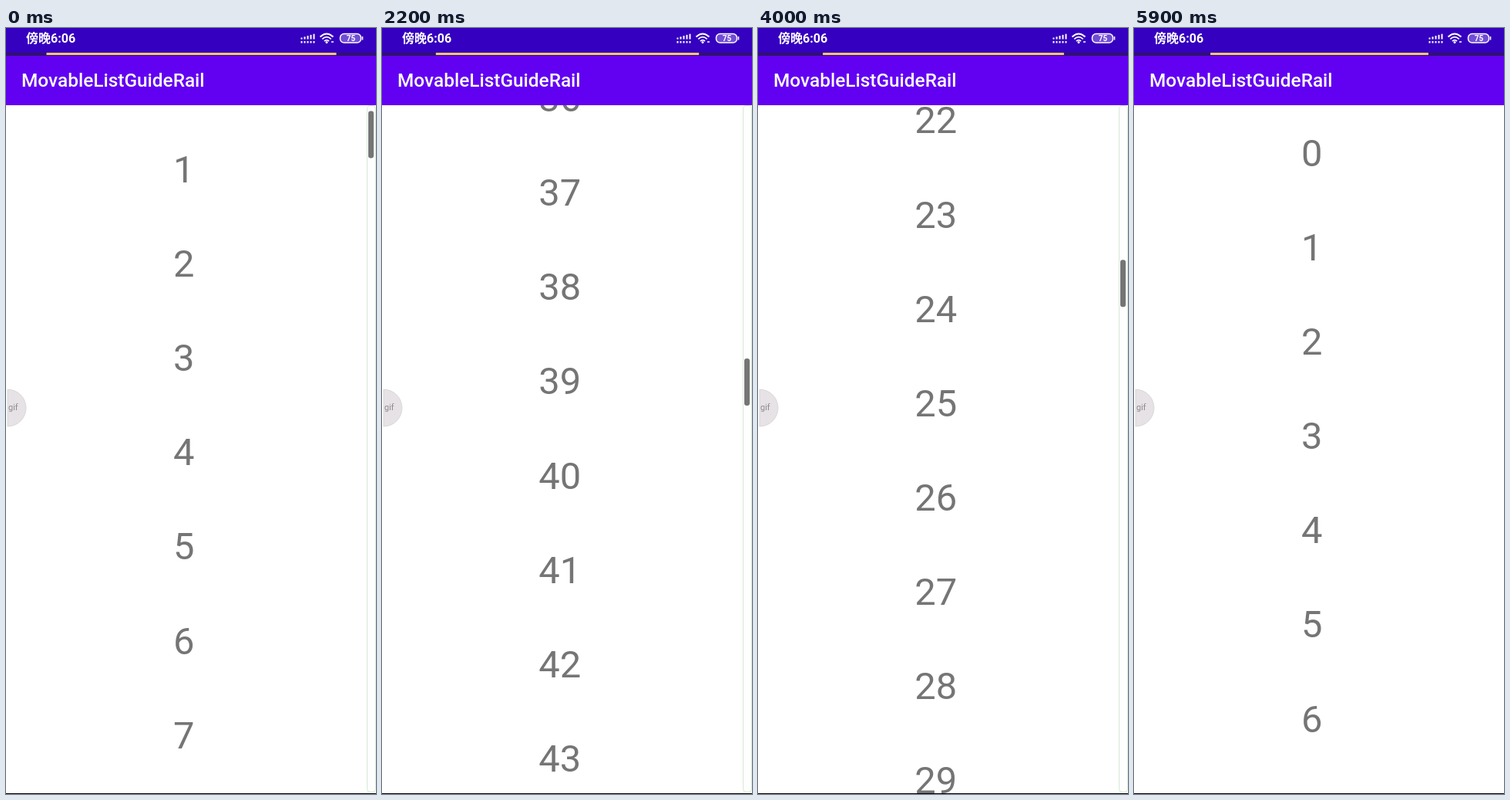
An HTML page that plays this animation: 480x992 px, repeating every 6000 ms.

```html
<!DOCTYPE html>
<html lang="zh">
<head>
<meta charset="utf-8">
<title>List scroll</title>
<style>
  html, body { margin: 0; width: 100%; height: 100%; overflow: hidden; background: #fff; }
  svg { display: block; width: 480px; height: 992px; font-family: Roboto, "Noto Sans CJK SC", "Noto Sans CJK", sans-serif; }
  #list text { font-size: 48.9px; fill: #757575; text-anchor: middle; }
</style>
</head>
<body>
<svg viewBox="0 0 480 992">
  <defs>
    <clipPath id="view"><rect y="100" width="462" height="891"/></clipPath>
  </defs>
  <rect width="480" height="992" fill="#fff"/>

  <g clip-path="url(#view)">
    <g id="list"></g>
    <g id="glow"><circle cx="231" cy="-521" r="591" fill="#8200ff" fill-opacity=".2"/></g>
  </g>

  <g id="bar">
    <rect x="468.5" y="100.5" width="11" height="889" rx="4" fill="#fff" stroke="#d4e8d4"/>
    <rect id="thumb" x="470" y="100" width="7" height="61" rx="3" fill="#757575"/>
  </g>

  <!-- status bar -->
  <rect width="480" height="32" fill="#3500c0"/>
  <rect y="32" width="480" height="4" fill="#30126e"/>
  <rect id="progress" y="32" height="3" fill="#ffc474"/>
  <text x="26" y="19" font-size="16" font-weight="700" fill="#fff">傍晚6:06</text>
  <g id="signal" fill="#fff"></g>
  <g fill="none" stroke="#fff" stroke-width="1.8">
    <path d="M407.500 11.500Q416 3.500 424.500 11.500M410.300 14.300Q416 9 421.700 14.300M413 17Q416 14.200 419 17"/>
    <rect x="433.500" y="7.500" width="27" height="11.500" rx="5" stroke-width="1.5" fill="#fff" fill-opacity=".3"/>
  </g>
  <circle cx="416" cy="18.500" r="1.500" fill="#fff"/>
  <path d="M422 18h3M462.500 11v4.500" stroke="#fff" stroke-width="1.500"/>
  <text x="447.500" y="17" font-size="10" font-weight="700" fill="#fff" text-anchor="middle">75</text>

  <!-- app bar -->
  <rect y="36" width="480" height="64" fill="#6200f2"/>
  <text x="20" y="76" font-size="24.4" font-weight="500" fill="#fff">MovableListGuideRail</text>

  <!-- floating button -->
  <path d="M2 468a24 24 0 0 1 0 48z" fill="#e6e2e6" stroke="#d4d4d4" stroke-width=".8"/>
  <text x="3" y="495" font-size="11" fill="#8c8c8c">gif</text>

  <rect y="991" width="480" height="1" fill="#000"/>
</svg>
<script>
  const LOOP = 6000, STEP = 100, PITCH = 122.15, TOP_HIT = 5.1;
  const $ = id => document.getElementById(id);
  const add = (parent, tag, attrs) => {
    const el = document.createElementNS('http://www.w3.org/2000/svg', tag);
    for (const k in attrs) el.setAttribute(k, attrs[k]);
    return parent.appendChild(el);
  };

  for (let n = 0; n < 60; n++)
    add($('list'), 'text', { x: 230.7, y: 178.6 + n * PITCH }).textContent = n;

  for (let i = 0; i < 5; i++) {
    const x = 382.5 + i * 4, h = 2 + i * 1.2;
    add($('signal'), 'rect', { x, y: 14.5 - h, width: 2, height: h });
    add($('signal'), 'rect', { x, y: 17, width: 2, height: 2.5 });
  }

  // scroll knots: seconds, offset, velocity
  const knots = [
    [0, 101, 700], [1.1, 1510, 1750], [2.2, 4468, 0],
    [3.4, 2492, 0], [4.6, 2967, 0], [TOP_HIT, 0, -6000]
  ];

  function offset(t) {
    const i = knots.findIndex(k => k[0] > t);
    if (i < 0) return 0;
    const [t0, a, va] = knots[i - 1], [t1, b, vb] = knots[i];
    const d = t1 - t0, u = (t - t0) / d, w = 1 - u;
    return (1 + 2 * u) * w * w * a + u * w * w * d * va
         + u * u * (3 - 2 * u) * b - u * u * w * d * vb;
  }

  function glowAt(t) {
    if (t < TOP_HIT) return 0;
    if (t < 5.2) return 0.6;
    return Math.max(0, 1 - (t - 5.2) / 0.5) ** 1.5;
  }

  function draw() {
    const ms = performance.now() % LOOP;
    const t = Math.floor(ms / STEP) * STEP / 1000;
    const s = offset(t), g = glowAt(t), left = 52.5 + 7.9 * t;

    $('list').setAttribute('transform', `translate(0 ${-s})`);
    $('thumb').setAttribute('y', 100 + s * 0.0734);
    $('bar').setAttribute('visibility', t < TOP_HIT ? 'visible' : 'hidden');
    $('glow').setAttribute('transform', `translate(0 ${100 * (1 - g)}) scale(1 ${g})`);
    $('glow').setAttribute('opacity', g);
    $('progress').setAttribute('x', left);
    $('progress').setAttribute('width', 481 - 2 * left);
    requestAnimationFrame(draw);
  }
  draw();
</script>
</body>
</html>
```
